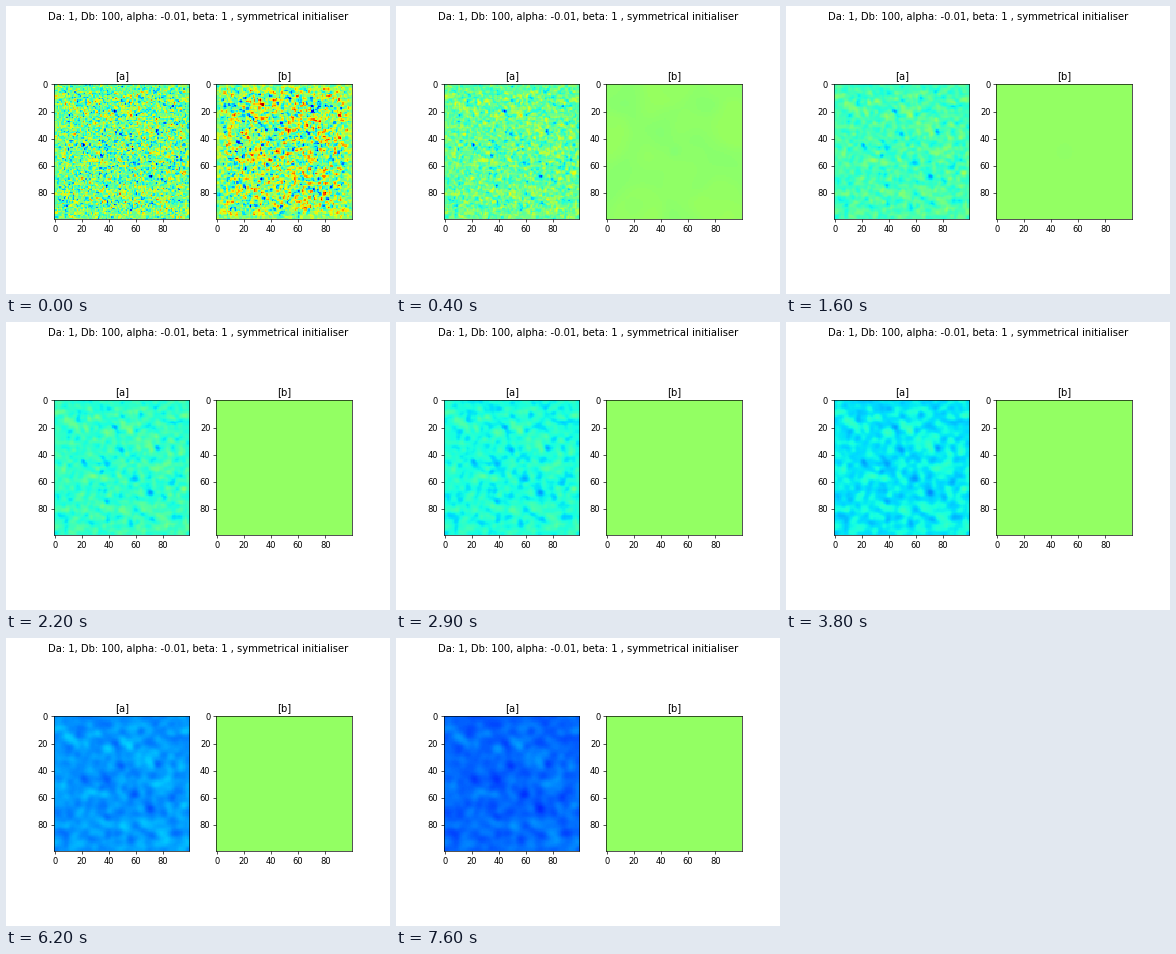
A matplotlib script for the animation above (8 s loop, 384 by 288 pixels).

```python
import numpy as np
import matplotlib.pyplot as plt
from matplotlib.animation import FuncAnimation

N = 100
INTERVAL = 100
FRAMES = 80
SLOWDOWN = 4800   # ms, from here the field moves on less often
SLOW_STEP = 460   # ms

# Low spots of [a] that outlive the noise, as (x, y).
SHARP_SPOTS = [(44, 20), (75, 35), (21, 45), (71, 68), (38, 75)]
WIDE_SPOTS = [(48, 37), (61, 43), (38, 47), (45, 60), (58, 58), (87, 17)]

rng = np.random.default_rng(7)
yy, xx = np.mgrid[:N, :N]
freq = np.fft.fftfreq(N)
freq2 = freq[:, None] ** 2 + freq[None, :] ** 2


def bump(x, y, radius):
    return np.exp(-((xx - x) ** 2 + (yy - y) ** 2) / radius ** 2)


def diffuse(field, variance):
    """Gaussian blur on a periodic grid."""
    kernel = np.exp(-2 * np.pi ** 2 * variance * freq2)
    return np.fft.ifft2(np.fft.fft2(field) * kernel).real


def grain(variance, edge_level):
    """Unit noise that gets weaker towards the borders."""
    edge = np.minimum(np.minimum(xx, N - 1 - xx), np.minimum(yy, N - 1 - yy))
    window = edge_level + (1 - edge_level) * np.clip(edge / 8, 0, 1)
    noise = diffuse(rng.normal(size=(N, N)), variance) * window
    return (noise - noise.mean()) / noise.std()


def lobes(count=5, first=48):
    """Flat-topped swells spread evenly around the centre, with a dip in it."""
    angles = np.radians(first + 360 / count * np.arange(count))
    ring = sum(bump(50 + 52 * np.cos(a), 50 + 52 * np.sin(a), 20)
               for a in angles)
    return 1 / (1 + np.exp(-14 * (ring - 0.42))) - bump(50, 50, 4)


noise_a = grain(0.15, 0.7)
noise_a -= sum(4.5 * bump(x, y, 1.1) for x, y in SHARP_SPOTS)
noise_a -= sum(bump(x, y, 2.1) for x, y in WIDE_SPOTS)
noise_a -= noise_a.mean()
noise_b = grain(0.4, 0.4)
swell = lobes()


def field_a(t):
    field = diffuse(noise_a, 0.75 * t)
    contrast = 0.1 / np.sqrt(1 + 5.5 * t)
    return 0.485 - 0.034 * t + contrast * field / field.std()


def field_b(t):
    base = 0.53 - 0.014 * np.exp(-1.1 * t)
    ripple = 0.12 * np.exp(-4 * t) * diffuse(noise_b, 90 * t)
    return base + 0.018 * np.exp(-1.2 * t) * swell + ripple


def field_time(frame):
    """Seconds reached by the field, held between the slow steps."""
    ms = frame * INTERVAL
    if ms > SLOWDOWN:
        ms -= (ms - SLOWDOWN) % SLOW_STEP
    return ms / 1000


fig, axes = plt.subplots(1, 2, figsize=(6.4, 4.8), dpi=60)
fig.suptitle("Da: 1, Db: 100, alpha: -0.01, beta: 1 , symmetrical initialiser")
images = []
for ax, name in zip(axes, "ab"):
    images.append(ax.imshow(np.zeros((N, N)), cmap="jet", vmin=0, vmax=1,
                            interpolation="nearest"))
    ax.set_title(f"[{name}]")
    ax.set_xticks(range(0, N, 20))
    ax.set_yticks(range(0, N, 20))


def update(frame):
    t = field_time(frame)
    images[0].set_data(field_a(t))
    images[1].set_data(field_b(t))
    return images


anim = FuncAnimation(fig, update, frames=FRAMES, interval=INTERVAL,
                     repeat=True, repeat_delay=0)
plt.show()
```
